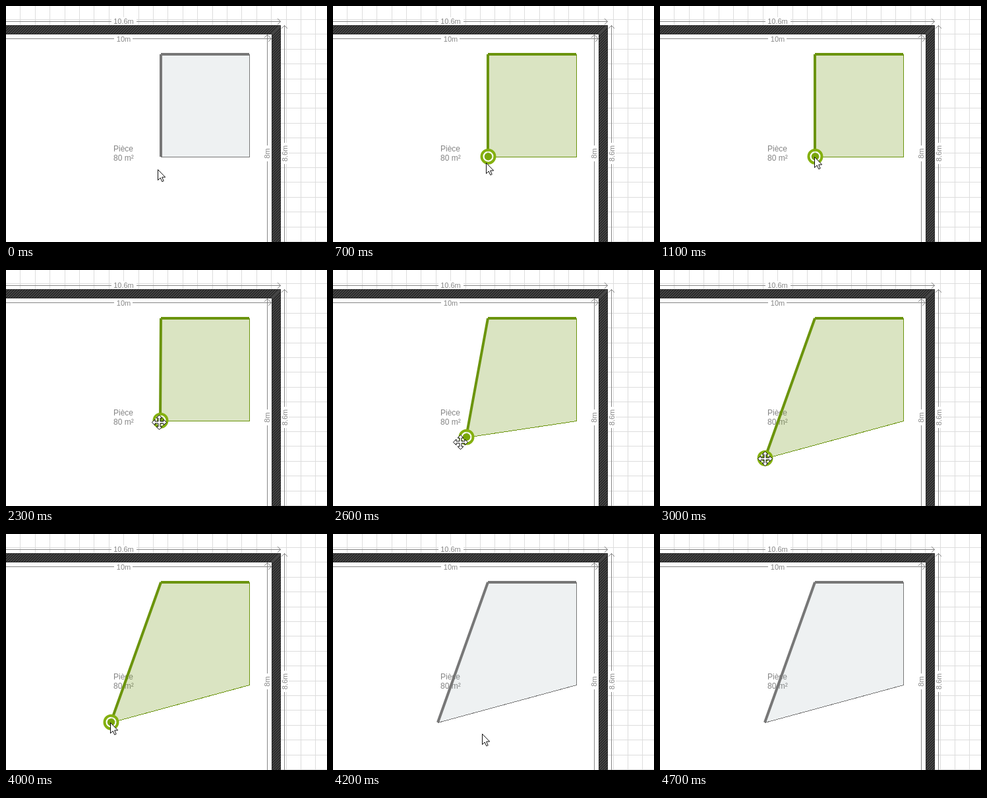
An HTML page that plays this animation: 487x357 px, repeating every 5.1 s.

```html
<!DOCTYPE html>
<html lang="fr">
<head>
<meta charset="utf-8">
<title>Plan</title>
<style>
html, body { margin: 0; width: 100%; height: 100%; overflow: hidden; background: #fff; }
svg { display: block; width: 487px; height: 357px; }
text { font-family: Arial, "Liberation Sans", sans-serif; fill: #858585; }
.dim text { font-size: 11px; text-anchor: middle; }
.dim path { fill: none; stroke: #858585; }
.dim rect { fill: #fff; }
.room { font-size: 12px; }
#shape { --line: #777; --fill: rgba(112, 136, 144, .12); }
#shape.on { --line: #6b940c; --fill: rgba(107, 148, 12, .25); }
#area { fill: var(--fill); }
#thin { fill: none; stroke: var(--line); shape-rendering: crispEdges; }
#thick { fill: none; stroke: var(--line); stroke-width: 4; }
#side { fill: #2d2d2d; }
#side.on { fill: #6b940c; }
.pointer { fill: #fff; stroke: #111; stroke-linejoin: round; }
</style>
</head>
<body>
<svg viewBox="0 0 487 357">
  <defs>
    <pattern id="hatch" width="4" height="4" patternUnits="userSpaceOnUse">
      <path d="M-1 1L1 -1M0 4L4 0M3 5L5 3" stroke="#fff" stroke-opacity=".26" stroke-width=".8"/>
    </pattern>
  </defs>
  <path id="grid" fill="none" stroke="#ddd"/>
  <path d="M0 29H417V357H0z" fill="#fff"/>
  <path d="M0 29H417L403 43H0z" fill="#2d2d2d"/>
  <path id="side" d="M417 29V357H403V43z"/>
  <path d="M0 29H417V357H403V43H0z" fill="url(#hatch)"/>
  <path d="M0 29.5H416.5V357M0 42.5H403.5V357" fill="none" stroke="#222" stroke-opacity=".6"/>

  <g class="dim">
    <path d="M0 23.5H417M412 19L416.5 23.5L412 28"/>
    <rect x="160" y="17" width="38" height="12"/>
    <text x="178.5" y="27">10.6m</text>
    <path d="M0 49.5H402M398 45L402.5 49.5L398 54"/>
    <rect x="164" y="44" width="28" height="12"/>
    <text x="178.5" y="54">10m</text>
    <path d="M396.5 357V43M392 48L396.5 43.5L401 48"/>
    <rect x="390" y="211" width="11" height="24"/>
    <text transform="translate(400 223)rotate(-90)">8m</text>
    <path d="M422.5 357V29M418 34L422.5 29.5L427 34"/>
    <rect x="418" y="207" width="11" height="32"/>
    <text transform="translate(427 223)rotate(-90)">8.6m</text>
  </g>

  <g class="room">
    <text x="163" y="220">Pièce</text>
    <text x="163" y="234">80 m²</text>
  </g>

  <g id="shape">
    <path id="area"/>
    <path id="thin"/>
    <path id="thick"/>
  </g>
  <g id="handle">
    <circle r="10" fill="#fff" fill-opacity=".8" stroke="#84b00f" stroke-width="4"/>
    <circle r="5.8" fill="#79a60b"/>
  </g>
  <path id="arrow" class="pointer" d="M.5 .5V16.5L4.2 13L6.8 18.7L9.2 17.6L6.7 12H11.7z"/>
  <path id="move" class="pointer"/>
</svg>
<script>
const $ = id => document.getElementById(id);
const LOOP = 5100, STEP = 100, CELL = 22.4;
const DRAG = 2300, DROP = 4000, GONE = 4700;
const LEAD = 55; // the pointer runs ahead of the dragged corner
const REACH = 12;

const ease = (t, from, to) => {
  const k = Math.min(1, Math.max(0, (t - from) / (to - from)));
  return (1 - Math.cos(Math.PI * k)) / 2;
};
const mix = (a, b, k) => a.map((v, i) => v + (b[i] - v) * k);

const corner = t => mix([235, 228], [159, 285], ease(t, 2260, 3000));

function pointer(t) {
  if (t < DRAG) return mix([230, 247], [234, 228], ease(t, 250, 1100));
  if (t < DROP) return corner(t + LEAD);
  return mix([158, 285], [428, 352], ease(t, 4000, 4600));
}

const show = (el, on) => el.setAttribute('visibility', on ? 'visible' : 'hidden');
const place = (el, x, y) => el.setAttribute('transform', `translate(${x} ${y})`);

function buildGrid() {
  let d = '';
  for (let x = 469.4; x > 0; x -= CELL) d += `M${Math.round(x) + .5} 0V357`;
  for (let y = 20; y < 357; y += CELL) d += `M0 ${Math.round(y) + .5}H487`;
  $('grid').setAttribute('d', d);
}

// One arm of the four-way pointer, repeated by quarter turns
function buildMove() {
  const arm = [[-1.5, -1.5], [-1.5, -6.5], [-4.5, -6.5], [0, -11], [4.5, -6.5], [1.5, -6.5]];
  const pts = [];
  for (let q = 0; q < 4; q++) {
    for (let [x, y] of arm) {
      for (let n = 0; n < q; n++) [x, y] = [-y, x];
      pts.push([x + .5, y + .5]);
    }
  }
  $('move').setAttribute('d', `M${pts.join('L')}z`);
}

function draw(time) {
  const t = Math.floor((time % LOOP) / STEP) * STEP;
  const [px, py] = pointer(t).map(Math.round);
  const [cx, cy] = corner(t).map(Math.round);
  const dragging = t >= DRAG && t < DROP;
  const hot = dragging || Math.hypot(px - cx, py - cy) < REACH;

  $('shape').classList.toggle('on', hot);
  $('side').classList.toggle('on', px > 403 && px < 417);
  $('area').setAttribute('d', `M235 73H369.5V228.5L${cx} ${cy}z`);
  $('thin').setAttribute('d', `M369.5 73V228.5L${cx} ${cy + .5}`);
  $('thick').setAttribute('d', `M${cx} ${cy}L235 73M235 73H369`);

  place($('handle'), cx + .5, cy - .3);
  show($('handle'), hot);
  place($('arrow'), px, py);
  show($('arrow'), !dragging && t < GONE);
  place($('move'), px, py);
  show($('move'), dragging);
}

buildGrid();
buildMove();
const start = performance.now();
function tick() {
  draw(performance.now() - start);
  requestAnimationFrame(tick);
}
tick();
</script>
</body>
</html>
```
